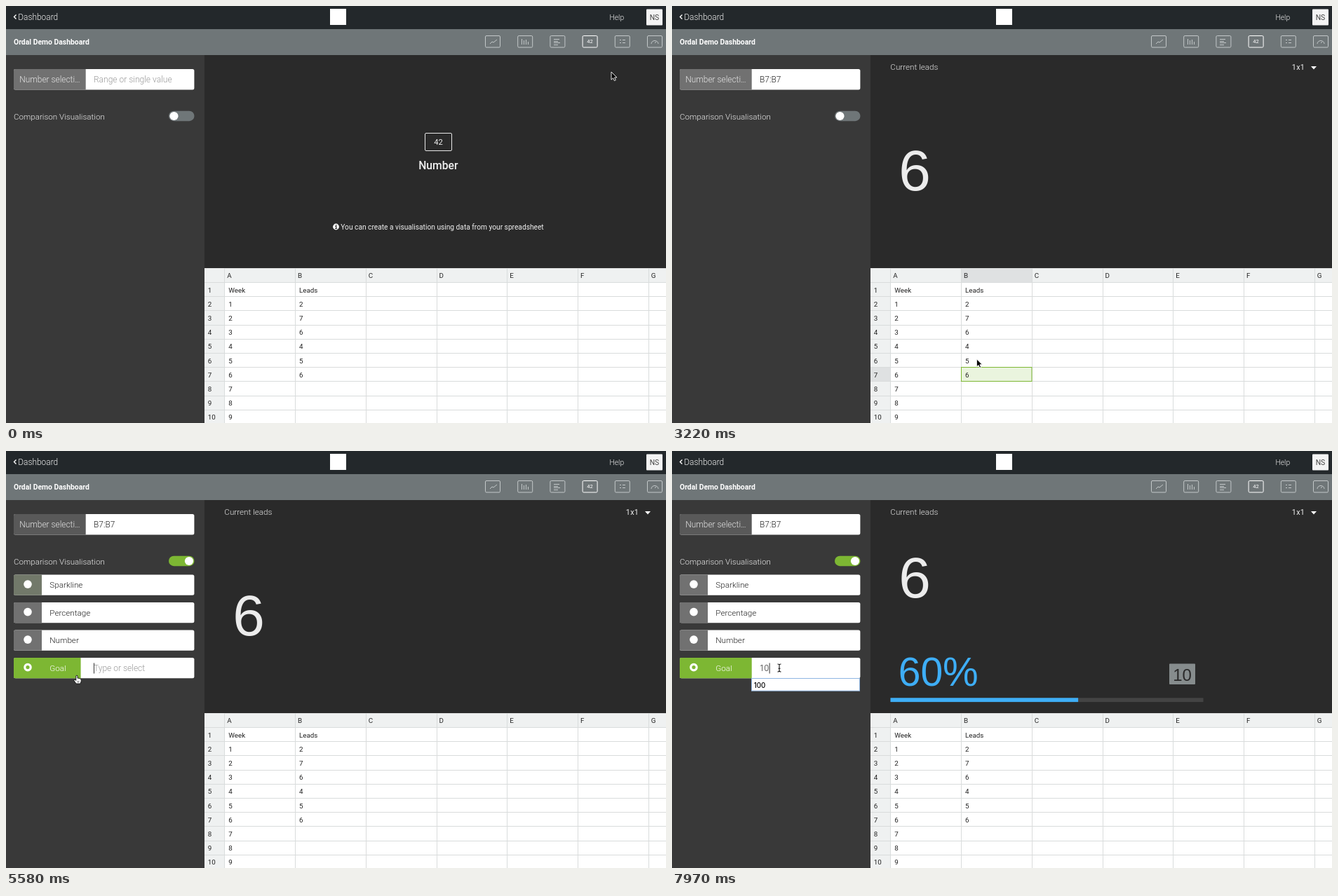
These frames come from a looping animation (941x595 px, 8000 ms). An HTML page:

```html
<!DOCTYPE html>
<html lang="en">
<head>
<meta charset="utf-8">
<title>Number widget demo</title>
<style>
  html, body { margin: 0; width: 100%; height: 100%; overflow: hidden; background: #2a2a2a; }
  svg { display: block; }
  text { font: 300 12px Roboto, "Liberation Sans", sans-serif; white-space: pre; }
  .figure { font-family: "Liberation Sans", sans-serif; }
  .list { font-family: Inter, sans-serif; }
</style>
</head>
<body>
<svg width="941" height="595"><g id="still"></g><g id="live"></g></svg>
<script>
const LOOP = 8000;
const GREEN = '#7db733', BLUE = '#3eaef6', GREY = '#6f7678', DARK = '#2a2a2a', LABEL = '#717171', INK = '#222';

// Drawing helpers, each returning SVG markup
const rect = (x, y, w, h, fill, more = '') =>
  `<rect x="${x}" y="${y}" width="${w}" height="${h}" fill="${fill}" ${more}/>`;
const text = (x, y, str, fill, size = 12, weight = 300, more = '') =>
  `<text x="${x}" y="${y}" fill="${fill}" style="font-size:${size}px;font-weight:${weight}" ${more}>${str}</text>`;
const line = (d, color, width = 1, more = '') =>
  `<path d="${d}" fill="none" stroke="${color}" stroke-width="${width}" ${more}/>`;
const circle = (x, y, r, fill, more = '') => `<circle cx="${x}" cy="${y}" r="${r}" fill="${fill}" ${more}/>`;
const middle = 'text-anchor="middle"';
const figure = (x, y, str, fill, size, more = '') => text(x, y, str, fill, size, 400, `class="figure" ${more}`);

// Spreadsheet geometry
const SHEET = { left: 283, top: 374.3, colA: 311.8, colW: 100.75, rowH: 20.2 };
const colX = c => SHEET.colA + c * SHEET.colW;
const rowY = r => SHEET.top + r * SHEET.rowH;
const crisp = v => Math.floor(v) + .5;
const leads = ['Leads', 2, 7, 6, 4, 5, 6];

function sheet(selected) {
  const { left, top, rowH, colW } = SHEET;
  let out = rect(left, top, 658, 221, '#fff') +
    rect(left, top, 658, rowH, '#eff1f1') + rect(left, top, 29, 221, '#eff1f1');
  if (selected) {
    out += rect(colX(1), top, colW, rowH, '#dfe1e2') + rect(left, rowY(7), 29, rowH, '#dfe1e2');
  }
  let grid = '';
  for (let c = 0; c < 7; c++) grid += `M${crisp(colX(c))} ${top}V595`;
  for (let r = 1; r < 11; r++) grid += `M${left} ${crisp(rowY(r))}H941`;
  out += line(grid, '#d9dcdc');
  const cell = (x, y, str) => text(x, y, str, INK, 9.8, 400);
  [...'ABCDEFG'].forEach((name, c) => out += cell(colX(c) + 3.4, 388, name));
  for (let r = 1; r < 11; r++) {
    const y = rowY(r) + 14;
    out += cell(287.8, y, r) + cell(317.3, y, r > 1 ? r - 1 : 'Week') + cell(418, y, leads[r - 1] ?? '');
  }
  if (selected) {
    out += rect(412.5, 515.5, 100.5, 20, selected, `stroke="${GREEN}"`) + cell(418, rowY(7) + 14, 6);
  }
  return out;
}

function header() {
  const icons = [
    'M690 54l3-3 2 1 5-4', 'M735.5 47v8M738.5 49v6M741.5 48v7M744.5 51v4',
    'M781 47.5h8M781 50.5h6M781 52.5h9M781 55.5h6', '',
    'M875 48.5h2M879 48.5h4M875 52.5h2M879 52.5h4', 'M920 54a5 4.5 0 0 1 10 0M925 53l2-2'
  ];
  let out = rect(0, 0, 941, 33, '#23282b') + rect(0, 33, 941, 37, GREY) + rect(0, 70, 283, 525, '#393939') +
    line('M14.5 12.5l-3 3 3 3', '#fff', 1.4) + text(17.3, 20, 'Dashboard', '#f0f0f0', 11.9) +
    rect(462, 4, 23, 23, '#fff') + text(860.5, 19.7, 'Help', '#f0f0f0', 10.3) +
    rect(913, 4.5, 23, 23, '#f4f4f4', 'rx="1"') + text(924.5, 20, 'NS', '#444', 10.4, 400, middle) +
    text(11, 55.3, 'Ordal Demo Dashboard', '#fff', 10.4, 700);
  icons.forEach((d, i) => {
    const color = i == 3 ? '#fff' : '#c3c8c9';
    out += rect(683.5 + i * 46.2, 42.5, 21, 16.5, 'none', `stroke="${color}" rx="1.5"`) + line(d, color);
  });
  return out + text(832.5, 53.3, '42', '#fff', 7.6, 400, middle);
}

still.innerHTML = header() + text(11, 162, 'Comparison Visualisation', '#ececec', 11.6);

const clamp = v => Math.max(0, Math.min(1, v));
const ramp = (t, from, to) => clamp((t - from) / (to - from));
const easeOut = p => 1 - (1 - p) ** 1.6;
const mix = (a, b, p) => a + (b - a) * p;

// Pointer stops: time, x, y
const stops = [
  [0, 863, 94], [59, 863, 94], [60, 860, 90], [240, 860, 90], [520, 836, 61], [820, 836, 61],
  [1570, 256, 139], [1690, 256, 139], [1930, 200, 106], [2040, 200, 106], [2460, 440, 526],
  [2640, 440, 526], [2930, 444, 522], [3200, 444, 522], [3860, 253, 160], [4360, 253, 160],
  [5110, 99, 320], [5170, 101, 320], [5670, 101, 320], [6160, 143, 310], [7850, 146, 310], [7970, 153, 309.5]
];

function pointerAt(t) {
  const i = stops.findIndex(s => s[0] > t);
  if (i < 0) return stops.at(-1).slice(1);
  const [t0, x0, y0] = stops[i - 1], [t1, x1, y1] = stops[i];
  const p = easeOut(ramp(t, t0, t1));
  return [mix(x0, x1, p), mix(y0, y1, p)];
}

const shapes = {
  arrow: '<path d="M0 0V11.2L2.6 8.8 4.4 12.6 6.3 11.7 4.6 8H8Z" stroke="#fff" stroke-width=".9"/>',
  hand: '<path d="M-1.2 .8Q0-.6 1 .8V4.2Q2.2 3.4 3 4.6 4.2 4 4.8 5.2 6.4 5 6.2 6.8V8.6L5 12H-1L-4 7.6Q-4.2 6-2.8 6.2L-1.2 7.4Z" fill="#fff" stroke="#111" stroke-width=".9"/><path d="M1 8v2.5M2.8 8v2.5" stroke="#111" stroke-width=".6"/>',
  beam: line('M-2.5-5.5Q0-5.5 0-4V4Q0 5.5-2.5 5.5M2.5-5.5Q0-5.5 0-4M0 4Q0 5.5 2.5 5.5M-1.5 .8H1.5', '#111', 1.1)
};

function pointer(t) {
  if (t >= 7180 && t < 7850) return '';
  const [x, y] = pointerAt(t);
  const inField = x > 114 && x < 268 && (t < 2500 ? y > 90 && y < 119 : t > 5600);
  const shape = inField ? 'beam' : t > 3750 ? 'hand' : 'arrow';
  return `<g transform="translate(${x} ${y})">${shapes[shape]}</g>`;
}

function field(y, label, labelFill, split) {
  return rect(11, y, 257.4, 29.4, '#fff', 'rx="2.5"') +
    `<path d="M13 ${y}H${split}v29.4H13q-2 0-2-2v-25.4q0-2 2-2" fill="${labelFill}"/>` + label;
}

const caret = (x, y) => rect(x, y, 1, 15, '#333');
const placeholder = (y, str) => text(125, y, str, '#999', 12);

function numberField(t) {
  const label = text(19.3, 109, 'Number selecti…', '#e6e6e6', 11.9);
  let out = field(90, label, t < 5410 ? LABEL : '#595959', 113.7);
  out += t < 2700 ? placeholder(109, 'Range or single value') : text(125, 109, 'B7:B7', INK, 11.9);
  if (t > 1980 && t < 2440) out += caret(125, 97);
  return out;
}

function toggle(t) {
  const p = t < 4100 ? 0 : t < 4150 ? .6 : 1;
  return rect(232, 149.7, 36.5, 14.5, p ? GREEN : GREY, 'rx="7.25"') + circle(mix(239.5, 261, p), 157, 6.1, '#fff');
}

function options(t) {
  if (t < 4100) return '';
  const p = easeOut(ramp(t, 5410, 5640)), goal = t >= 5410;
  let out = '';
  ['Sparkline', 'Percentage', 'Number', 'Goal'].forEach((name, i) => {
    const y = 176.4 + i * 39.5, on = i == (goal ? 3 : 0);
    const split = i == 3 ? mix(51, 113.7, p) : 51;
    const base = i == 0 && goal && p < 1 ? `color-mix(in srgb, ${GREEN} ${(1 - p) * 100}%, ${LABEL})` : LABEL;
    out += field(y, '', on ? GREEN : base, split) +
      (on ? circle(31, y + 13.7, 4.2, 'none', 'stroke="#fff" stroke-width="3.2"') : circle(31, y + 13.7, 5.8, '#fff')) +
      text(62.3, y + 18.7, name, on && i == 3 ? '#fff' : INK, 11.7);
  });
  return out + (goal ? goalEntry(t) : '');
}

function goalEntry(t) {
  const typed = t < 7180 ? '' : t < 7650 ? '1' : '10';
  const blink = t < 5990 || t >= 6340 && t < 6820 || t >= 7180;
  let out = typed ? text(125, 314, typed, INK, 11.9) : placeholder(314, 'Type or select');
  if (blink) out += caret(125 + typed.length * 6.8, 302.5);
  if (t >= 6340) out += dropdown(typed);
  return out;
}

function dropdown(typed) {
  const items = {
    '': [45000, 3, 200000, 8, 30, 100], 1: [100, 15, 12, 150], 10: [100]
  }[typed];
  return rect(113.5, 324.5, 154, items.length * 17.3 + .4, '#fff', 'stroke="#8fb6e2"') +
    items.map((v, i) => text(116.8, 337.8 + i * 17.25, v, '#000', 9.7, 500, 'class="list"')).join('');
}

const intro = rect(597.5, 181.5, 38, 25, 'none', 'stroke="#e8e8e8" rx="1.5"') +
  text(616.5, 198, '42', '#f0f0f0', 11.2, 400, middle) +
  text(616.3, 233.3, 'Number', '#f0f0f0', 15.7, 500, middle) +
  circle(470.5, 315, 4.4, '#fff') + line('M470.7 312v1.4M469.3 314.3h1.5v3.2M469 317.5h3.2', DARK, 1.2) +
  text(477.3, 318.8, 'You can create a visualisation using data from your spreadsheet', '#f0f0f0', 10.2, 400);

function widget(t) {
  if (t < 2760) return intro;
  const baseline = t >= 7180 ? 208.7 : t >= 4100 && t < 5410 ? 211.7 : 262.7;
  let out = text(311.3, 91.3, 'Current leads', '#e6e6e6', 11.7) + text(883.8, 91.3, '1x1', '#f0f0f0', 10.8, 400, 'letter-spacing=".3"') +
    '<path d="M911 86h8l-4 4.5z" fill="#fff"/>' + figure(323.3, baseline, '6', '#ececec', 82);
  if (t >= 7180) out += progress(t < 7650 ? 1 : 10);
  return out;
}

function progress(target) {
  const share = 6 / target, width = target > 9 ? 37 : 24;
  return figure(322.7, 334.5, Math.round(share * 100) + '%', BLUE, 57) +
    rect(746 - width, 303.5, width, 29.5, '#868c8d', 'rx="1"') +
    figure(746 - width / 2, 327.5, target, DARK, 24, middle) +
    rect(311.5, 352.3, 446, 5.8, '#444') + rect(311.5, 352.3, 446 * Math.min(1, share), 5.8, BLUE);
}

function cellFill(t) {
  if (t < 2640 || t >= 5410) return '';
  return t < 4100 ? '#eaf4de' : '#a7d37e';
}

function draw(now) {
  const t = now % LOOP;
  live.innerHTML = numberField(t) + toggle(t) + options(t) + widget(t) + sheet(cellFill(t)) + pointer(t);
  requestAnimationFrame(draw);
}
requestAnimationFrame(draw);
</script>
</body>
</html>
```
